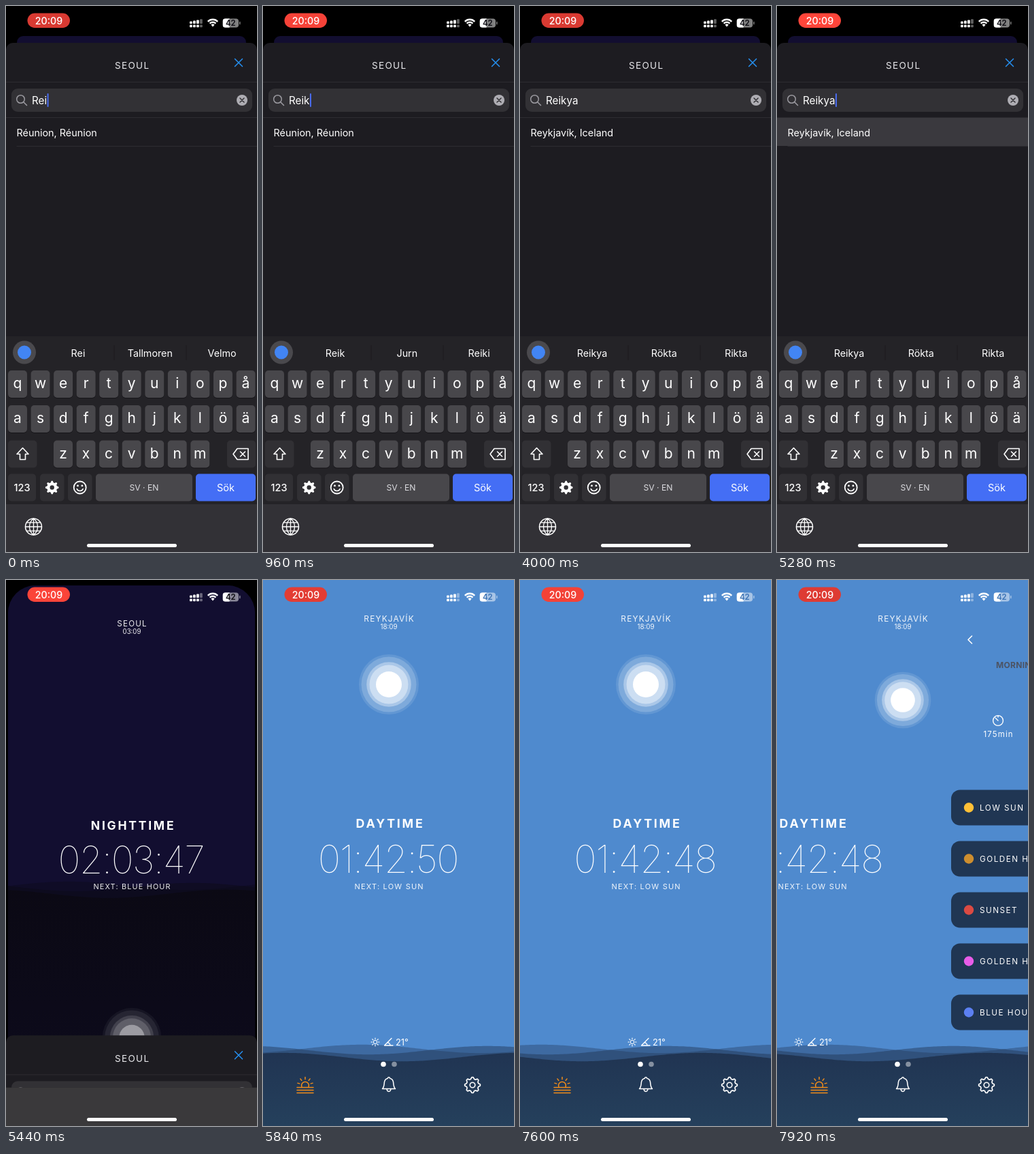
An HTML page with a canvas for the animation above (8000 ms loop, 369 by 800 pixels).

```html
<!DOCTYPE html>
<html lang="en">
<head>
<meta charset="utf-8">
<title>City search</title>
<style>
html, body { margin: 0; width: 100%; height: 100%; overflow: hidden; background: #000; }
canvas { display: block; width: 369px; height: 800px; }
</style>
</head>
<body>
<canvas id="stage"></canvas>
<script>
const W = 369, H = 800, LOOP = 8000, STEP = 80, TAU = Math.PI * 2;
const canvas = document.getElementById('stage');
const c = canvas.getContext('2d');
const dpr = window.devicePixelRatio || 1;
canvas.width = W * dpr;
canvas.height = H * dpr;

const DISMISS = 5290, SWAP = 5520, SWIPE = 7640;
const typed = [
  [-400, 'Rei', ['Rei', 'Tallmoren', 'Velmo']],
  [640, 'Reik', ['Reik', 'Jurn', 'Reiki']],
  [2640, 'Reiky', ['Reiky', 'Rikta', 'Reika']],
  [2960, 'Reikya', ['Reikya', 'Rökta', 'Rikta']]
];
const results = [
  [-400, ['Réunion, Réunion']],
  [1200, ['Venlo, Netherlands', 'Dendermonde, Belgium', 'Vleuten, Nederland']],
  [3440, ['Reykjavík, Iceland']]
];
const presses = [[560, 'k'], [2560, 'y'], [2880, 'a']];
const cards = [['LOW SUN', '#ffc037'], ['GOLDEN HOUR', '#cd8e2f'], ['SUNSET', '#db4a43'],
  ['GOLDEN HOUR', '#e85ce8'], ['BLUE HOUR', '#5c80f2']];

const clamp = v => Math.max(0, Math.min(1, v));
const lerp = (a, b, p) => a + (b - a) * p;
const mix = (a, b, p) => `rgb(${a.map((v, i) => Math.round(lerp(v, b[i], p)))})`;
const white = a => `rgba(255,255,255,${a})`;
const latest = (list, t) => list.filter(e => e[0] <= t).pop();

function text(s, x, y, size, color, align = 'center', weight = 400, gap = 0) {
  c.font = `${weight} ${size}px Inter, Roboto, sans-serif`;
  c.letterSpacing = gap + 'px';
  c.textAlign = align;
  c.fillStyle = color;
  c.fillText(s, x + (align === 'center' ? gap / 2 : 0), y + size * 0.364);
}
function box(x, y, w, h, r, color) {
  c.beginPath();
  c.roundRect(x, y, w, h, r);
  c.fillStyle = color;
  c.fill();
}
function disc(x, y, r, color) {
  c.beginPath();
  c.arc(x, y, r, 0, TAU);
  c.fillStyle = color;
  c.fill();
}
function stroke(path, color, width) {
  c.strokeStyle = color;
  c.lineWidth = width;
  c.lineCap = c.lineJoin = 'round';
  c.stroke(new Path2D(path));
}
function ring(x, y, r, color, width) {
  c.beginPath();
  c.arc(x, y, r, 0, TAU);
  c.strokeStyle = color;
  c.lineWidth = width;
  c.stroke();
}
function at(x, y, draw) {
  c.save();
  c.translate(x, y);
  draw();
  c.restore();
}
function rays(from, to, n, start, sweep, color, width) {
  for (let i = 0; i < n; i++) {
    const a = start + sweep * i, x = Math.cos(a), y = Math.sin(a);
    stroke(`M${x * from} ${y * from}L${x * to} ${y * to}`, color, width);
  }
}
function gearPath(r, depth) {
  c.beginPath();
  for (let i = 0; i < 32; i++) {
    const a = (i - 0.5) / 32 * TAU, k = i % 4 < 2 ? r : r - depth;
    c.lineTo(Math.cos(a) * k, Math.sin(a) * k);
  }
  c.closePath();
}

// Main screen

// Three copies of one wave, each with its own crest, drift to the right.
function ground(t, top, day) {
  const dark = [11, 9, 20], deep = [32, 52, 82];
  const waves = [[-3, 145, 0.36], [-1, 330, 0.46], [9, 30, 1]];
  for (const [dy, crest, alpha] of waves) {
    c.beginPath();
    c.moveTo(0, H + 20);
    for (let x = 0; x <= W + 3; x += 3) {
      const a = (x - crest - (t - 5840) * 0.134) / 350 * TAU;
      c.lineTo(x, top + dy - 6.2 * Math.cos(a));
    }
    c.lineTo(W, H + 20);
    c.closePath();
    if (alpha === 1) {
      const g = c.createLinearGradient(0, top, 0, H);
      g.addColorStop(0, mix(dark, deep, day));
      g.addColorStop(1, mix([13, 11, 30], [37, 64, 92], day));
      c.fillStyle = g;
    } else c.fillStyle = mix(dark, deep, day);
    c.globalAlpha = alpha;
    c.fill();
    c.globalAlpha = 1;
  }
}

function orb(y, scale, day) {
  const rings = [[44, 0.11], [40.5, 0.18], [32.8, 0.34], [28.5, 0.4], [19, 1]];
  for (const [r, a] of rings) disc(185, y, r * scale, white(a * lerp(0.38, 1, day)));
}

function weather() {
  at(165, 677, () => {
    ring(0, 0, 2.7, '#fff', 1);
    rays(4.4, 6, 8, 0, TAU / 8, '#fff', 1.1);
  });
  stroke('M189 671.5L178.5 682H191M183 678C185.5 678 187 680 187 682', '#fff', 1.3);
  text('21°', 195, 677, 12.8, '#fff', 'left');
}

function tabs() {
  disc(177, 709.5, 3.8, '#fff');
  disc(193, 709.5, 3.8, white(0.45));
  at(62, 740, () => {
    const o = '#f08c1a';
    stroke('M-12 3.5H12M-12 7.5H12M-12 11.5H12M-5 3A5.5 5.5 0 1 1 5 3', o, 1.5);
    rays(8.5, 11.5, 5, Math.PI * 1.08, Math.PI * 0.21, o, 1.5);
  });
  at(185, 739, () => {
    stroke('M-9.5 6.5C-6.5 3.5 -7 -1 -6.5 -3.5C-6 -7 -3 -8.5 -1.6 -8.8C-1.6 -11.2 1.6 -11.2 1.6 -8.8C3 -8.5 6 -7 6.5 -3.5C7 -1 6.5 3.5 9.5 6.5Z', '#fff', 1.5);
    stroke('M-2.8 7C-2.8 11.5 2.8 11.5 2.8 7', '#fff', 1.5);
  });
  at(308, 740, () => {
    gearPath(11.4, 2.4);
    c.strokeStyle = '#fff';
    c.lineWidth = 1.7;
    c.lineJoin = 'round';
    c.stroke();
    ring(0, 0, 3.8, '#fff', 1.6);
  });
}

function phasePage(t, day) {
  const left = day ? 50 - Math.floor((t - 5200) / 1000) : 47;
  text(day ? 'DAYTIME' : 'NIGHTTIME', 185.7, 357, 17.8, '#fff', 'center', 700, 2.8);
  text((day ? '01:42:' : '02:03:') + left, 184.6, 408, 56.4, '#fff', 'center', 100, -1.4);
  text(day ? 'NEXT: LOW SUN' : 'NEXT: BLUE HOUR', 185, 448.5, 11, white(0.92), 'center', 400, 1.2);
  if (day) weather();
}

function listPage() {
  stroke('M419.5 82L414 87.5L419.5 93', '#fff', 1.6);
  text('MORNING', 455, 124.5, 12, '#4c5363', 'left', 700, 0.3);
  ring(458, 206, 7.4, '#fff', 1.4);
  stroke('M458 206L454 202M458 198.6V201', '#fff', 1.4);
  text('175min', 458, 225.5, 11.4, '#fff', 'center', 400, 1.2);
  cards.forEach(([name, color], i) => {
    const y = 307.5 + i * 75;
    box(389, y, 329, 52, 13, '#203653');
    disc(415, y + 26, 7.2, color);
    text(name, 431, y + 26, 11.7, '#fff', 'left', 400, 1.5);
  });
}

function mainScreen(t) {
  const e = clamp((t - 5440) / 320), day = e * e * (3 - 2 * e);
  const k = Math.pow(clamp((t - SWIPE) / 280), 1.35), swipe = 133 * k;
  const isDay = t >= SWAP;
  c.fillStyle = mix([18, 14, 48], [79, 138, 206], day);
  c.fillRect(0, 0, W, H);
  ground(t, lerp(450, 690, day), day);
  orb(lerp(673, 153, day) + 23 * k, lerp(1, 0.94, k), day);
  text(isDay ? 'REYKJAVÍK' : 'SEOUL', 185, 57, 11.8, white(0.92), 'center', 400, 1.2);
  text(isDay ? '18:09' : '03:09', 185, 68.5, 9.8, white(0.92));
  at(-swipe, 0, () => {
    phasePage(t, isDay);
    if (swipe > 0) listPage();
  });
  tabs();
}

// Search sheet

function sheet(t, y) {
  const [since, query] = latest(typed, t);
  c.save();
  c.translate(0, y - 54);
  box(0, 54, W, H, [10, 10, 0, 0], '#1d1c21');
  text('SEOUL', 185, 87.5, 13.5, '#e9e9ec', 'center', 400, 1.35);
  stroke('M336.5 77.5L347.5 88.5M347.5 77.5L336.5 88.5', '#2590f2', 1.5);
  const rule = (x, ry) => { c.fillStyle = '#2d2c31'; c.fillRect(x, ry, W - x, 1); };
  rule(0, 111);
  box(8, 121, 354, 34, 9, '#323135');
  ring(21.5, 136.5, 5.8, '#9b9aa0', 1.5);
  stroke('M25.8 140.8L30.5 145.5', '#9b9aa0', 1.6);
  text(query, 38, 138, 15.2, '#fff', 'left');
  const idle = t - since;
  if (t < DISMISS && (idle < 600 || (idle - 600) % 1000 >= 500)) {
    box(38.5 + c.measureText(query).width, 128, 2, 20, 1, '#4a6ef5');
  }
  disc(347, 138, 8, '#aeadb3');
  stroke('M344 135L350 141M350 135L344 141', '#323135', 1.5);
  rule(0, 163);
  latest(results, t)[1].forEach((name, i) => {
    const ry = 164 + i * 41.5;
    if (t >= 4960) box(0, ry, W, 41, 0, '#3a393e');
    text(name, 15.5, ry + 21.5, 14.4, '#fff', 'left');
    rule(15.5, Math.round(ry + 41));
  });
  c.restore();
}

function keys(t) {
  const rows = [['qwertyuiopå', 17, 534], ['asdfghjklöä', 17, 585], ['zxcvbnm', 84, 636.5]];
  const special = '#313034', plain = '#48474b';
  const down = presses.find(([from]) => t >= from && t < from + 160);
  let pop = null;
  for (const [letters, x0, y] of rows) {
    [...letters].forEach((ch, i) => {
      const x = x0 + 33.55 * i;
      box(x - 14, y + 1, 28, 40, 5, '#161519');
      box(x - 14, y, 28, 40, 5, plain);
      text(ch, x, y + 18.5, 21, '#fff');
      if (down && down[1] === ch) pop = [ch, x, y];
    });
  }
  box(3, 636.5, 42.5, 40, 5, special);
  box(325, 636.5, 42, 40, 5, special);
  stroke('M24.5 647.5L33 656.5H28.5V664.5H20.5V656.5H16Z', '#fff', 1.6);
  stroke('M334 656.5L340 648.5H356V664.5H340ZM344.5 653L351.5 660M351.5 653L344.5 660', '#fff', 1.6);
  box(3, 685.5, 41, 40, 5, special);
  box(50, 685.5, 35.5, 40, 5, special);
  box(91, 685.5, 35.5, 40, 5, special);
  box(132, 685.5, 142, 40, 5, plain);
  box(279, 685.5, 88, 40, 5, '#446ef5');
  text('123', 23.5, 705.5, 14.5, '#fff', 'center', 500);
  at(67.7, 705.5, () => {
    gearPath(9.8, 2.4);
    c.fillStyle = '#fff';
    c.fill();
    disc(0, 0, 3.2, special);
  });
  at(108.7, 705.5, () => {
    ring(0, 0, 9, '#fff', 1.8);
    disc(-3.2, -2.6, 1.4, '#fff');
    disc(3.2, -2.6, 1.4, '#fff');
    stroke('M-4.5 2C-3 6 3 6 4.5 2', '#fff', 1.6);
  });
  text('SV · EN', 203, 705.5, 12.2, '#dcdce0');
  text('Sök', 323, 705.5, 14.5, '#fff');
  if (pop) {
    const [ch, x, y] = pop, px = Math.max(3, x - 19);
    box(px, y - 50, 38, 48, 8, '#5d5c61');
    box(x - 14, y - 12, 28, 52, 5, '#5d5c61');
    text(ch, px + 19, y - 28, 27, '#fff');
  }
}

function keyboard(t, y, p) {
  c.save();
  c.translate(0, y - 484);
  box(0, 484, W, 320, 0, '#242327');
  box(0, 730, W, 74, 0, '#323136');
  disc(27, 507.5, 17, '#4a494d');
  disc(27, 507.5, 10, '#4285f4');
  latest(typed, t)[2].forEach((s, i) => text(s, 106 + i * 105.8, 508.5, 14.3, '#fff'));
  box(158.5, 497, 1, 22, 0, '#1c1b1f');
  box(264.5, 497, 1, 22, 0, '#1c1b1f');
  keys(t);
  at(40.5, 763, () => {
    ring(0, 0, 12, '#fff', 1.5);
    stroke('M0 -12V12M-12 0H12M-10 -6.2H10M-10 6.2H10M0 -12C-8 -6 -8 6 0 12C8 6 8 -6 0 -12', '#fff', 1.3);
  });
  if (p > 0) {
    c.globalAlpha = clamp(p * 1.3);
    box(0, 484, W, 320, 0, '#3a393b');
    c.globalAlpha = 1;
  }
  c.restore();
}

// System overlays

function statusBar(t) {
  const glow = 0.5 + 0.5 * Math.cos((t - 5260) / 2000 * TAU);
  box(31.5, 10.5, 62.5, 21.5, 10.75, mix([210, 56, 48], [255, 69, 58], glow));
  text('20:09', 63, 21.5, 14.2, '#fff', 'center', 500);
  for (let i = 0; i < 4; i++) {
    const color = i < 3 ? '#fff' : white(0.38), h = 3.4 + i * 1.1;
    box(270 + i * 5, 26 - h, 3.8, h, 1, color);
    box(270 + i * 5, 27.6, 3.8, 3.6, 1, color);
  }
  at(304, 30, () => {
    for (const r of [10.2, 6.2]) {
      c.beginPath();
      c.arc(0, 0, r, -Math.PI * 0.75, -Math.PI * 0.25);
      c.strokeStyle = '#fff';
      c.lineWidth = 2.4;
      c.lineCap = 'butt';
      c.stroke();
    }
    c.beginPath();
    c.moveTo(0, 0.5);
    c.arc(0, 0, 3.6, -Math.PI * 0.75, -Math.PI * 0.25);
    c.fillStyle = '#fff';
    c.fill();
  });
  c.save();
  c.beginPath();
  c.roundRect(318.5, 18.5, 23.5, 13, 4);
  c.clip();
  box(318.5, 18, 24, 14, 0, white(0.5));
  box(318.5, 18, 10, 14, 0, '#fff');
  c.restore();
  box(343, 22.8, 1.5, 4.4, 0.75, white(0.5));
  text('42', 330.3, 25, 11.2, t < SWAP ? '#16151b' : '#4278b8', 'center', 700);
}

function draw(t) {
  c.setTransform(dpr, 0, 0, dpr, 0, 0);
  c.fillStyle = '#000';
  c.fillRect(0, 0, W, H);
  const w = Math.max(0, t - DISMISS) * 0.021;
  const p = 1 - (1 + w) * Math.exp(-w);
  const open = p < 0.993;
  c.save();
  if (open) {
    const s = lerp(0.913, 1, p);
    c.translate(W * (1 - s) / 2, 44 * (1 - p));
    c.scale(s, s);
    c.beginPath();
    c.roundRect(0, 0, W, H + 40, lerp(10, 48, p));
    c.clip();
  }
  mainScreen(t);
  c.restore();
  if (open) {
    sheet(t, lerp(54, H, p));
    keyboard(t, lerp(484, H, p), p);
  }
  statusBar(t);
  box(119, 788, 132, 5, 2.5, '#fff');
}

const start = performance.now();
function tick() {
  const t = (performance.now() - start) % LOOP;
  draw(Math.floor(t / STEP) * STEP);
  requestAnimationFrame(tick);
}
tick();
</script>
</body>
</html>
```
